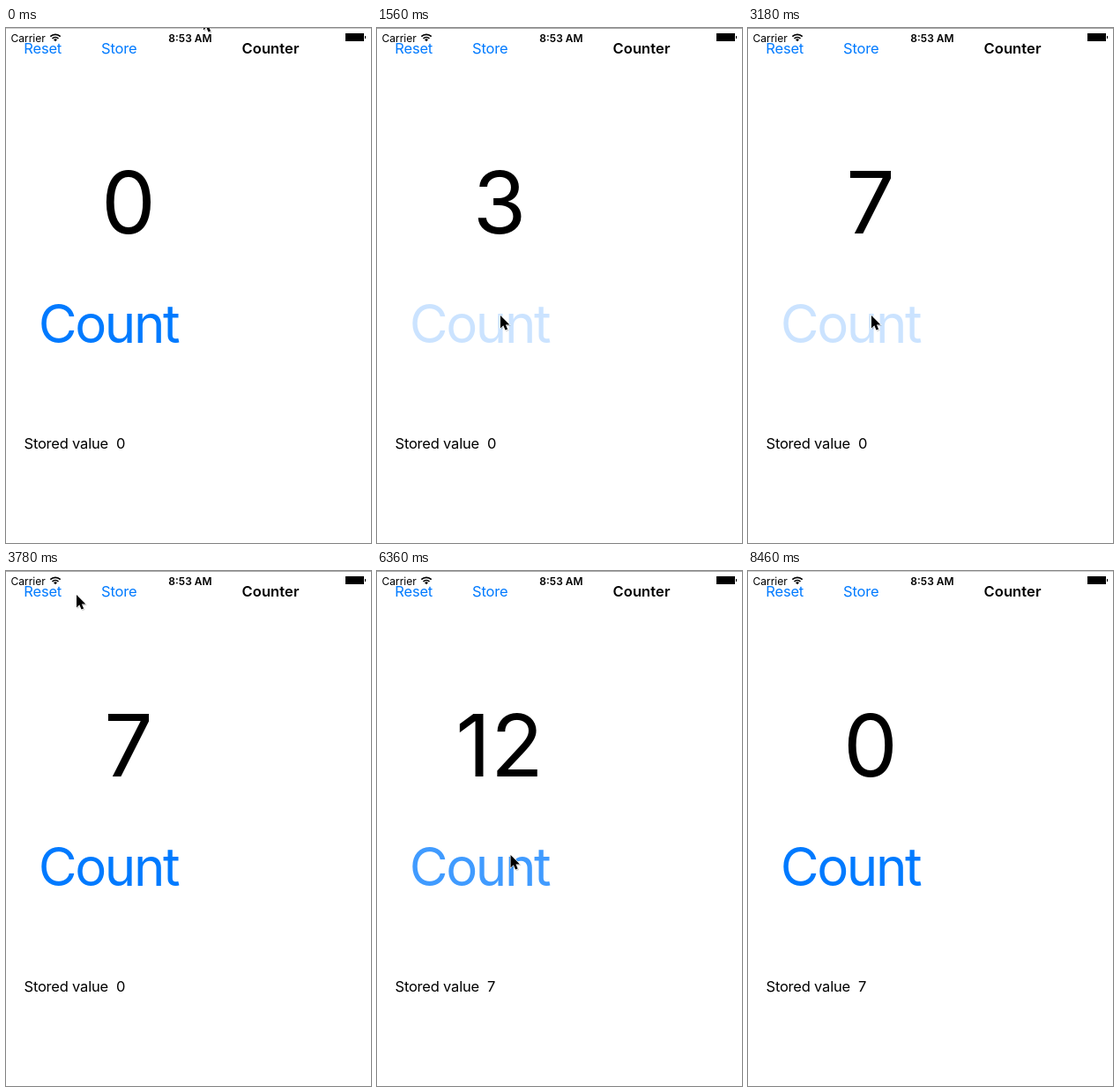
These frames come from a looping animation (414x584 px, 8.52 s). An HTML page:

```html
<!DOCTYPE html>
<html lang="en">
<head>
<meta charset="utf-8">
<title>Counter</title>
<style>
  html, body { margin: 0; width: 100%; height: 100%; overflow: hidden; background: #fff; }
  svg { display: block; width: 414px; height: 584px; }
  text { font: 16.5px Inter, Roboto, sans-serif; font-optical-sizing: none; letter-spacing: -.2px; }
  .status { font-size: 12px; letter-spacing: 0; }
  .bold { font-weight: 600; }
  .title { letter-spacing: .1px; }
  .button { fill: #007aff; }
  .center { text-anchor: middle; }
  #total { font-size: 98px; letter-spacing: 0; }
  #count { font-size: 60px; letter-spacing: -2.4px; }
</style>
</head>
<body>
<svg viewBox="0 0 414 584">
  <rect id="edge" width="414" height="1"/>
  <text class="status" x="5.5" y="16">Carrier</text>
  <g fill="none" stroke="#000" stroke-width="1.7">
    <path d="M50.3 9.6a8.2 8.2 0 0 1 11.4 0M52.5 12a5 5 0 0 1 7 0"/>
    <path d="M56 15.3l-2-2a2.8 2.8 0 0 1 4 0z" fill="#000" stroke="none"/>
  </g>
  <text class="status bold" x="184.3" y="16">8:53 AM</text>
  <path d="M385 6h21v9h-21zM407 9h1v3h-1z"/>
  <text id="reset" class="button" x="20.3" y="29">Reset</text>
  <text id="store" class="button" x="108.1" y="29">Store</text>
  <text class="bold title" x="267.5" y="29">Counter</text>
  <text id="total" class="center" x="139" y="233">0</text>
  <text id="count" class="button center" x="116" y="357">Count</text>
  <text x="20.5" y="477">Stored value</text>
  <text id="stored" x="125" y="477">0</text>
  <g id="cursor">
    <path d="M1 2v14l3.3-3 2.3 5.2 3-1.3-2.2-5h4.6z" opacity=".18"/>
    <path d="M0 0v14.4l3.3-3.1 2.2 5.2 2.6-1.1-2.2-5h4.5z" stroke="#fff" stroke-width="1.1" paint-order="stroke"/>
  </g>
</svg>
<script>
const LOOP = 8520, STEP = 60, HOLD = 60, FADE = 420;
const STORE = 4500, RESET = 7500, EXIT = 7800;
const el = id => document.getElementById(id);
const ease = k => (1 - Math.cos(Math.PI * k)) / 2;
const progress = (t, from, to) => Math.min(1, Math.max(0, (t - from) / (to - from)));

// Evenly spaced button releases
const burst = (first, gap, n) => Array.from({ length: n }, (_, i) => first + i * gap);
const releases = {
  count: [...burst(1100, 230, 5), ...burst(3000, 180, 2), ...burst(5580, 130, 5)],
  store: [STORE],
  reset: [RESET]
};

// Pointer moves between the buttons
const origin = { x: 224, y: -12 };
const moves = [
  { from: 180, to: 900, x: 140, y: 326 },
  { from: 3360, to: 3780, x: 80, y: 27 },
  { from: 3780, to: 4020, x: 126, y: 24 },
  { from: 4620, to: 5280, x: 163, y: 354 },
  { from: 6270, to: 6720, x: 43, y: 19 },
  { from: 7620, to: EXIT, x: 58, y: 5 }
];

function opacity(times, t) {
  const last = times.findLast(r => r - HOLD <= t);
  return last === undefined ? 1 : .2 + .8 * ease(progress(t, last, last + FADE));
}

function pointer(t) {
  let { x, y } = origin;
  for (const m of moves) {
    const k = ease(progress(t, m.from, m.to));
    x += (m.x - x) * k;
    y += (m.y - y) * k;
  }
  return [x, y];
}

const countAt = t => releases.count.filter(r => r <= t).length;

function draw(now) {
  const t = Math.floor(now % LOOP / STEP) * STEP;
  for (const id in releases) el(id).setAttribute("opacity", opacity(releases[id], t));
  el("total").textContent = t < RESET ? countAt(t) : 0;
  el("stored").textContent = t < STORE ? 0 : countAt(STORE);
  el("edge").setAttribute("fill", t >= 1080 && t < 8460 ? "#a9a9a9" : "#cdcdcd");
  el("cursor").setAttribute("transform", `translate(${pointer(t)})`);
  el("cursor").setAttribute("visibility", t > EXIT ? "hidden" : "visible");
}

const start = performance.now();
function tick() {
  draw(performance.now() - start);
  requestAnimationFrame(tick);
}
tick();
</script>
</body>
</html>
```
